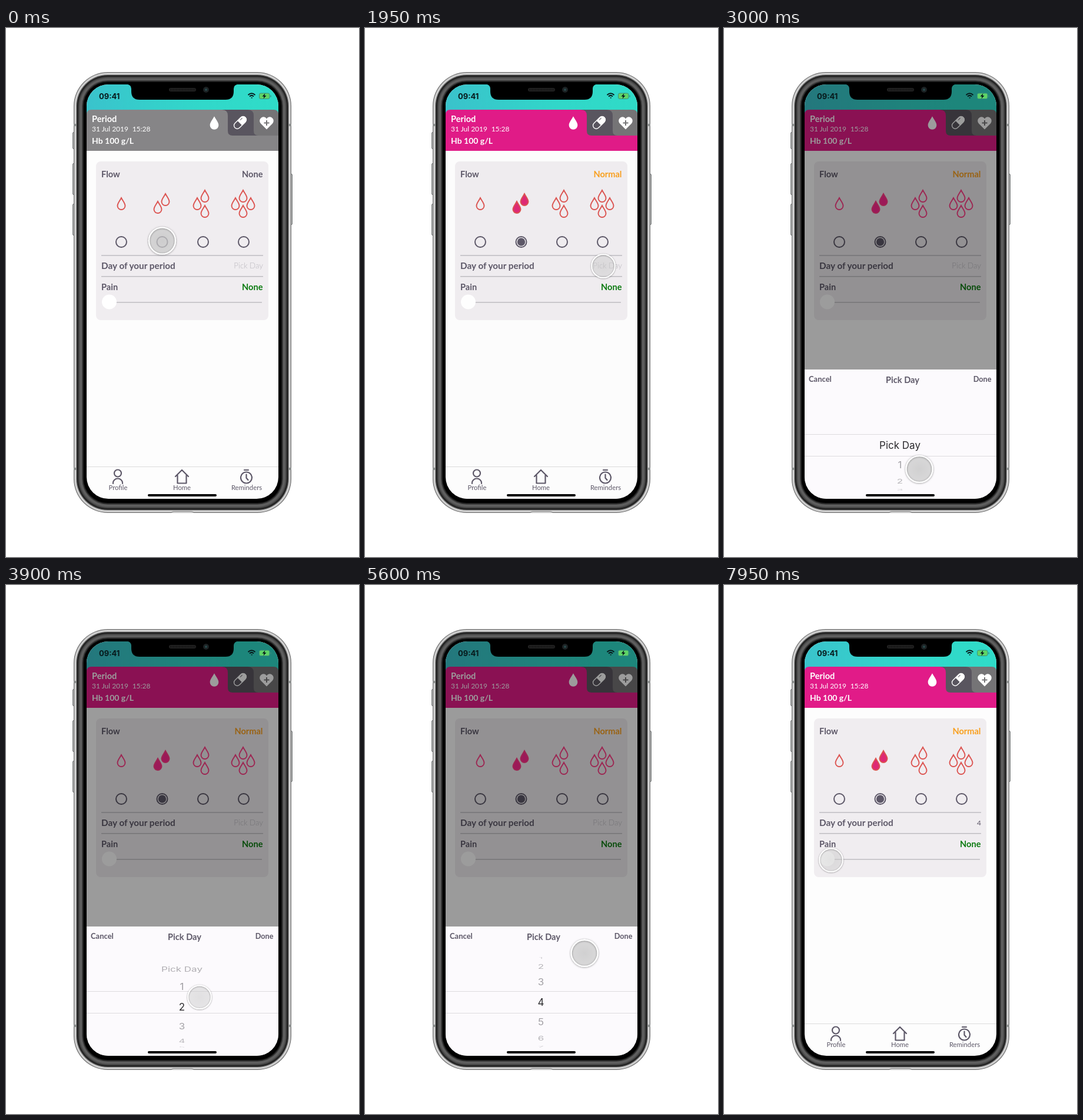
An HTML page for the animation above (8000 ms loop, 600x900 px).

```html
<!DOCTYPE html>
<html lang="en">
<head>
<meta charset="utf-8">
<title>Period tracker</title>
<style>
  html, body { margin: 0; width: 100%; height: 100%; overflow: hidden; background: #fff; }
  svg { display: block; width: 600px; height: 900px; }
  text { font-family: Lato, "Open Sans", sans-serif; fill: #5d5868; }
  .b { font-weight: 700; font-size: 14.6px; }
  .l { font-weight: 300; font-size: 13.3px; }
  .date { font-size: 12px; fill: #fff; }
  .tab { font-size: 11.3px; text-anchor: middle; }
  .end { text-anchor: end; }
  .mid { text-anchor: middle; }
  .w { fill: #fff; }
  .ui { font-family: Inter, sans-serif; }
  .icon { fill: none; stroke: #5d5868; stroke-width: 2.2; stroke-linejoin: round; stroke-linecap: round; }
  #wheel text { font-size: 17px; text-anchor: middle; }
</style>
</head>
<body>
<svg viewBox="0 0 600 900">
  <defs>
    <clipPath id="screen"><rect x="137" y="96" width="326" height="705" rx="37"/></clipPath>
    <linearGradient id="teal"><stop stop-color="#3ac3cc"/><stop offset=".6" stop-color="#31d8ca"/><stop offset="1" stop-color="#2fdcc8"/></linearGradient>
    <radialGradient id="glass">
      <stop stop-color="#c2c2c2"/><stop offset="1" stop-color="#cdcdcd"/>
    </radialGradient>
    <filter id="shadow" x="-30%" y="-30%" width="160%" height="160%">
      <feDropShadow dx="0" dy=".5" stdDeviation="1.4" flood-opacity=".5"/>
    </filter>
    <path id="drop" d="M0-10C2.5-5 6.5-1 6.5 3.500A6.500 6.500 0 0 1-6.500 3.500C-6.500-1-2.500-5 0-10Z"/>
  </defs>

  <!-- Phone body -->
  <g fill="#c9cac9" stroke="#6a6d6e">
    <rect x="113.500" y="177.500" width="5" height="28" rx="1.500"/>
    <rect x="113.500" y="230.500" width="5" height="53" rx="1.500"/>
    <rect x="113.500" y="299.500" width="5" height="53" rx="1.500"/>
    <rect x="481.500" y="248.500" width="5" height="86" rx="1.500"/>
  </g>
  <g id="body"></g>
  <path d="M115 165h5M480 165h5M115 750h5M480 750h5" stroke="#8d908f" stroke-width="4"/>
  <path d="M281 824.500q1-2 4-2h30q3 0 4 2" fill="#eee" stroke="#777"/>

  <g clip-path="url(#screen)">
    <rect x="137" y="96" width="326" height="705" fill="#fdfdfd"/>
    <rect x="137" y="96" width="326" height="60" fill="url(#teal)"/>
    <rect x="137" y="150" width="326" height="40" fill="#757476"/>

    <!-- Header -->
    <path d="M400 139H455q8 0 8 8V190H400Z" fill="#757476"/>
    <path d="M365 139H411q10 0 10 10V175q0 8 8 8H463V195H365Z" fill="#59555f"/>
    <path id="header" d="M137 147q0-8 8-8H367q10 0 10 10V175q0 8 8 8H463V209H137Z"/>
    <text class="b w" x="146" y="160">Period</text>
    <text class="date" x="146" y="176">31 Jul 2019</text>
    <text class="date end" x="245.500" y="176">15:28</text>
    <text class="b w" x="146" y="197" style="font-size:14px">Hb 100 g/L</text>
    <use href="#drop" transform="translate(354 161.500) scale(1.130)" fill="#fff"/>
    <g transform="translate(398 161) rotate(-45)">
      <rect x="-12.500" y="-5.500" width="25" height="11" rx="5.500" fill="none" stroke="#fff" stroke-width="1.400"/>
      <path d="M-1-6H7a6 6 0 0 1 0 12H-1Z" fill="#fff"/>
      <path d="M3-3H8" stroke="#59555f"/>
    </g>
    <path d="M443 172.500L433 162.500C427 155 438 146.500 443 154.500C448 146.500 459 155 453 162.500Z" fill="#fff"/>
    <path d="M443 157v9M438.500 161.500h9" stroke="#757476" stroke-width="2"/>

    <!-- Card -->
    <rect x="153" y="227" width="293" height="270" rx="8" fill="#f0edf0"/>
    <text class="b" x="162" y="253.500">Flow</text>
    <text class="b end" x="436.500" y="253.500" id="flow"></text>
    <g id="drops" fill="none" stroke-width="1.900"></g>
    <g id="radios" fill="none" stroke="#5d5868" stroke-width="2"></g>
    <circle id="dot" cx="265.500" cy="364" r="6.700" fill="#5d5868"/>
    <path d="M162 387H437M162 422.700H437M187 466.700H435" stroke="#bfbdc2" stroke-width="1.600"/>
    <text class="b" x="162" y="410" style="font-size:15.300px">Day of your period</text>
    <text class="l end" x="437" y="409" id="day"></text>
    <text class="b" x="162" y="446">Pain</text>
    <text class="b end" x="436.500" y="446" style="fill:#0a7a0f">None</text>
    <circle cx="175.500" cy="466" r="12.500" fill="#fff"/>

    <!-- Tab bar -->
    <path d="M137 746.500H463" stroke="#dcdcdc"/>
    <g class="icon">
      <circle cx="190" cy="757.500" r="6"/><path d="M182 775v-1a8 7.500 0 0 1 16 0v1"/>
      <path d="M288 763L299 752L310 763M291.500 761v13.500h15V761"/>
      <circle cx="408.500" cy="765" r="9.500"/><path d="M405 752h7M408.500 759.500v6l3 3.500"/>
    </g>
    <text class="tab" x="190.500" y="786">Profile</text>
    <text class="tab" x="299" y="786">Home</text>
    <text class="tab" x="409" y="786">Reminders</text>

    <rect id="shade" x="137" y="96" width="326" height="705"/>

    <!-- Status bar -->
    <text class="ui" x="158" y="120.500" style="font-size:13px;font-weight:700;fill:#07191b">09:41</text>
    <g fill="none" stroke="#07191b" stroke-width="2">
      <path d="M411.500 114q6-5.500 12 0M414 116.500q3.500-3.200 7 0"/><path d="M417.700 118v1.500"/>
    </g>
    <rect x="430.500" y="111" width="17.500" height="9.500" rx="2.500" fill="#5fd567" stroke="#3b8f7c"/>
    <path d="M450 114.500v3" stroke="#3b8f7c" stroke-width="1.300"/>
    <path d="M440.500 111l-5 5.500h3l-1 4 5-5.500h-3Z" fill="#07191b"/>

    <!-- Picker sheet -->
    <g id="sheet">
      <rect x="137" y="581" width="326" height="221" fill="#fcfafd"/>
      <text class="b" x="144" y="602" style="font-size:13px">Cancel</text>
      <text class="b mid" x="303.500" y="603.500">Pick Day</text>
      <text class="b end" x="454.500" y="602" style="font-size:12.700px">Done</text>
      <path d="M137 691.500H463M137 728.500H463" stroke="#dddbdf"/>
      <g id="wheel"></g>
    </g>
    <path d="M243 795H356" stroke="#000" stroke-width="4" stroke-linecap="round"/>
  </g>

  <!-- Notch -->
  <path d="M205 95.500q8 1 8 8V108q0 14 14 14H373q14 0 14-14V103.500q0-7 8-8Z"/>
  <path d="M280 105H320" stroke="#252525" stroke-width="6" stroke-linecap="round"/>
  <path d="M279 105H322" stroke="#0c0c0c" stroke-width="4" stroke-dasharray="1 1.500"/>
  <circle cx="340" cy="105" r="5" fill="#1d2224"/><circle cx="340" cy="105" r="2" fill="#27484a"/>

  <g id="touch">
    <circle id="pad" r="22.500" fill="url(#glass)"/>
    <circle r="22.500" fill="none" stroke="#fff" stroke-width="2.200" filter="url(#shadow)"/>
  </g>
</svg>
<script>
const $ = id => document.getElementById(id);
const add = (parent, tag, attrs) => {
  const el = document.createElementNS('http://www.w3.org/2000/svg', tag);
  for (const k in attrs) el.setAttribute(k, attrs[k]);
  return parent.appendChild(el);
};

// Metal rim as nested rounded bands: inset, grey level
[[0, 110], [1, 185], [2, 214], [4, 150], [5, 60], [6, 34], [8, 70], [10, 92], [12, 96], [14, 62], [15.5, 28], [17, 0]]
  .forEach(([inset, grey]) => add($('body'), 'rect', {
    x: 115 + inset, y: 75 + inset, width: 370 - 2 * inset, height: 750 - 2 * inset,
    rx: 58 - inset, fill: `rgb(${grey},${grey},${grey})`
  }));

const drops = [[196, 299], [258, 305], [271, 292], [338, 286], [325, 299], [338, 312],
  [403, 286], [390, 299], [416, 299], [403, 312]]
  .map(([x, y]) => add($('drops'), 'use', { href: '#drop', transform: `translate(${x} ${y})` }));
[196, 265.5, 335, 404].forEach(cx => add($('radios'), 'circle', { cx, cy: 364, r: 9 }));
const rows = ['Pick Day', 1, 2, 3, 4, 5, 6, 7, 8].map(label => {
  const row = add($('wheel'), 'text', { class: 'ui', y: 6 });
  row.textContent = label;
  return row;
});

const ramp = (t, a, b) => Math.min(1, Math.max(0, (t - a) / (b - a)));
const inOut = p => p < .5 ? 2 * p * p : 1 - 2 * (1 - p) ** 2;
const out = p => 1 - (1 - p) ** 3;

// Finger moves: start time, end time, target x, target y
const moves = [[900, 1750, 405, 405], [2100, 3150, 329, 765], [3400, 4380, 329, 643],
  [5200, 6100, 440, 601], [6550, 7700, 182, 468]];
// Finger presses: down, up
const presses = [[250, 400], [1800, 1950], [3220, 4400], [6100, 6250], [7750, 9000]];

function fingerAt(t) {
  let x = 265.5, y = 362;
  for (const [a, b, tx, ty] of moves) {
    const p = inOut(ramp(t, a, b));
    x += (tx - x) * p;
    y += (ty - y) * p;
  }
  const down = presses.reduce((s, [a, b]) => s + ramp(t, a, a + 100) - ramp(t, b, b + 100), 0);
  return { x, y, down };
}

function drawWheel(index) {
  rows.forEach((row, i) => {
    const offset = i - index, angle = offset * .458, flat = Math.cos(angle);
    const visible = Math.abs(angle) < 1.5;
    row.style.display = visible ? '' : 'none';
    if (!visible) return;
    row.setAttribute('transform', `translate(299 ${710 + 77 * Math.sin(angle)}) scale(1 ${flat})`);
    row.style.fill = Math.abs(offset) < .5 ? '#2b2a2d' : '#8f8d92';
    row.style.opacity = Math.abs(offset) < .5 ? 1 : .25 + .65 * flat;
  });
}

function draw() {
  const t = performance.now() % 8000;
  const chosen = t >= 420, done = t >= 6200;
  const open = out(ramp(t, 1950, 2300)) - out(ramp(t, 6200, 6550));

  $('header').setAttribute('fill', chosen ? '#e11b88' : '#868587');
  $('flow').textContent = chosen ? 'Normal' : 'None';
  $('flow').style.fill = chosen ? '#f9a01f' : '#5d5868';
  $('dot').style.display = chosen ? '' : 'none';
  $('drops').setAttribute('stroke', open > .5 ? '#ff3d85' : '#dc5350');
  const filled = open > .5 ? '#ff2890' : '#de2a74';
  drops.slice(1, 3).forEach(d => d.setAttribute('fill', chosen ? filled : 'none'));
  $('day').textContent = done ? '4' : 'Pick Day';
  $('day').style.cssText = done ? 'font-size:12px;font-weight:400' : 'fill:#b9b7bd';

  $('shade').setAttribute('opacity', .39 * open);
  $('sheet').setAttribute('transform', `translate(0 ${221 * (1 - open)})`);
  drawWheel(3.4 * inOut(ramp(t, 3400, 4380)) + .6 * out(ramp(t, 4400, 4900)));

  const { x, y, down } = fingerAt(t);
  $('touch').setAttribute('transform', `translate(${x} ${y}) scale(${1 - .12 * down})`);
  $('pad').setAttribute('opacity', .75 - .28 * down);
  requestAnimationFrame(draw);
}
draw();
</script>
</body>
</html>
```
